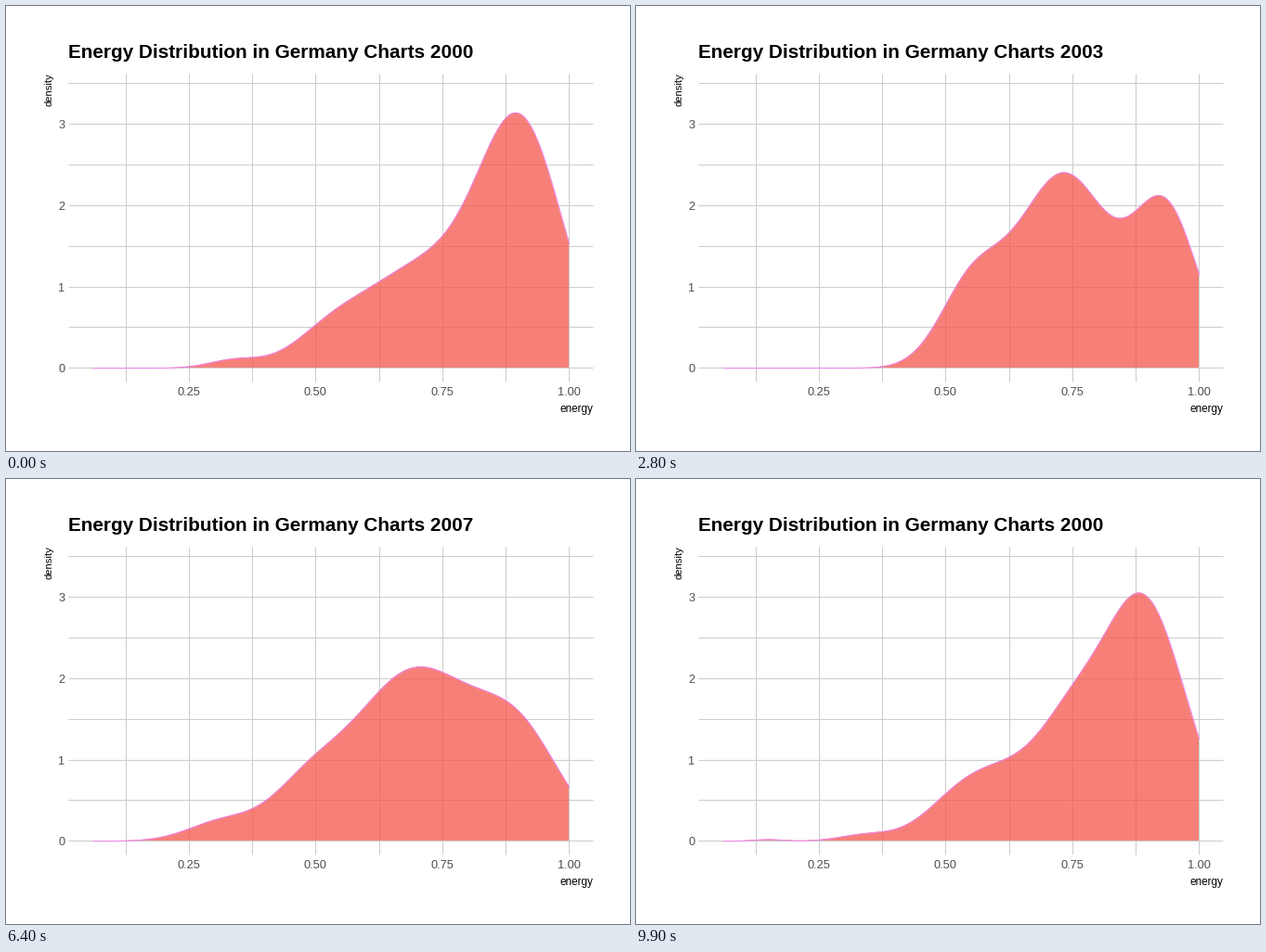
A matplotlib script that plays this animation: 672x480 px, repeating every 10 s.

```python
import numpy as np
import matplotlib.pyplot as plt
from matplotlib.animation import FuncAnimation
from matplotlib.patches import Polygon

W, H, DPI = 672, 480, 100
PT = 72 / DPI  # points per pixel
X = np.linspace(0.06, 1, 512)


def density(*bumps):
    """Sum of Gaussian bumps, each (centre, height, width)."""
    return sum(h * np.exp(-((X - c) / w) ** 2 / 2) for c, h, w in bumps)


def mix(a, b, t):
    return (1 - t) * a + t * b


def px(v):
    return 60.4 + 546 * v


def py(v):
    return 390.3 - 87.7 * v


curves = {
    2000: density((.905, 2.87, .083), (.71, 1.2, .11), (.53, .37, .075),
                  (.34, .1, .05)),
    2001: density((.9, 2.12, .1), (.67, 1.2, .125), (.54, .22, .05),
                  (.32, .23, .085), (.15, .065, .08)),
    2003: density((.935, 1.86, .064), (.733, 2.38, .093), (.55, .93, .063)),
    2006: density((.91, .95, .075), (.69, 2.22, .125), (.48, .5, .07),
                  (.33, .24, .06)),
    2008: density((.89, 1.43, .095), (.69, 1.85, .11), (.48, .57, .08),
                  (.29, .23, .065)),
    2009: density((.838, 3.05, .07), (.7, 2, .075), (.61, .27, .04),
                  (.49, .5, .045), (.335, .1, .04)),
    2010: density((.87, 2.7, .068), (.752, 2.2, .06), (.56, .98, .08),
                  (.15, .08, .03)),
}
curves[2002] = mix(curves[2001], curves[2003], 0.5)
curves[2004] = mix(curves[2003], curves[2006], 0.4)
curves[2005] = mix(curves[2003], curves[2006], 0.7)
curves[2007] = mix(curves[2006], curves[2008], 0.5)

# Each year rests for five frames, then blends into the next one;
# the first two blends take one frame longer.
BLENDS = [5, 5] + [4] * 9
STARTS = 5 + np.cumsum([0] + [steps + 5 for steps in BLENDS[:-1]])

plt.rcParams["font.family"] = "Liberation Sans"
fig = plt.figure(figsize=(W / DPI, H / DPI), dpi=DPI, facecolor="white")
ax = fig.add_axes([0, 0, 1, 1])
ax.set(xlim=(0, W), ylim=(H, 0))
ax.axis("off")


def label(x, y, text, size, color="black", **kw):
    return ax.text(x, y, text, fontsize=size * PT, color=color, **kw)


# Whole coordinates snap to the centre of that pixel.
grid = dict(color="#cccccc", lw=PT, snap=True, solid_capstyle="butt", zorder=1)
for v in np.arange(1, 9) / 8:
    x = round(px(v))
    ax.plot([x, x], [73, 405], **grid)
    if v * 4 % 1 == 0:
        label(px(v), 420, f"{v:.2f}", 12.8, "#4d4d4d", ha="center")
for v in np.arange(8) / 2:
    y = round(py(v))
    ax.plot([67, 632], [y, y], **grid)
    if v % 1 == 0:
        label(63.5, y + 5, f"{v:.0f}", 12.8, "#4d4d4d", ha="right")

label(632.5, 438, "energy", 11.7, ha="right")
label(49, 72, "density", 11.2, rotation=90, ha="right", va="baseline",
      rotation_mode="anchor")
title = label(67, 56, "", 20.8, weight="bold")

area = Polygon([[0, 0]], closed=True, facecolor="#f4564b", alpha=0.75, lw=0,
               zorder=2)
ax.add_patch(area)
outline, = ax.plot([], [], color="violet", lw=PT, solid_capstyle="butt",
                   zorder=3)


def state(frame):
    """Year shown in the title and the blended density curve."""
    k = np.searchsorted(STARTS, frame, side="right") - 1
    if k < 0:
        return 2000, curves[2000]
    now, after = 2000 + k, 2000 + (k + 1) % len(STARTS)
    t = min((frame - STARTS[k] + 1) / BLENDS[k], 1)
    return after if t > 0.5 else now, mix(curves[now], curves[after], t)


def update(frame):
    year, curve = state(frame)
    title.set_text(f"Energy Distribution in Germany Charts {year}")
    xs, ys = px(X), py(curve)
    outline.set_data(xs + 0.5, ys + 0.5)
    base, edge = round(py(0)), np.minimum(xs, round(px(1)))
    area.set_xy(np.column_stack([np.r_[edge[0], edge, edge[-1]],
                                 np.r_[base, np.minimum(ys, base), base]]))
    return title, outline, area


anim = FuncAnimation(fig, update, frames=100, interval=100, repeat=True,
                     repeat_delay=0)
plt.show()
```
